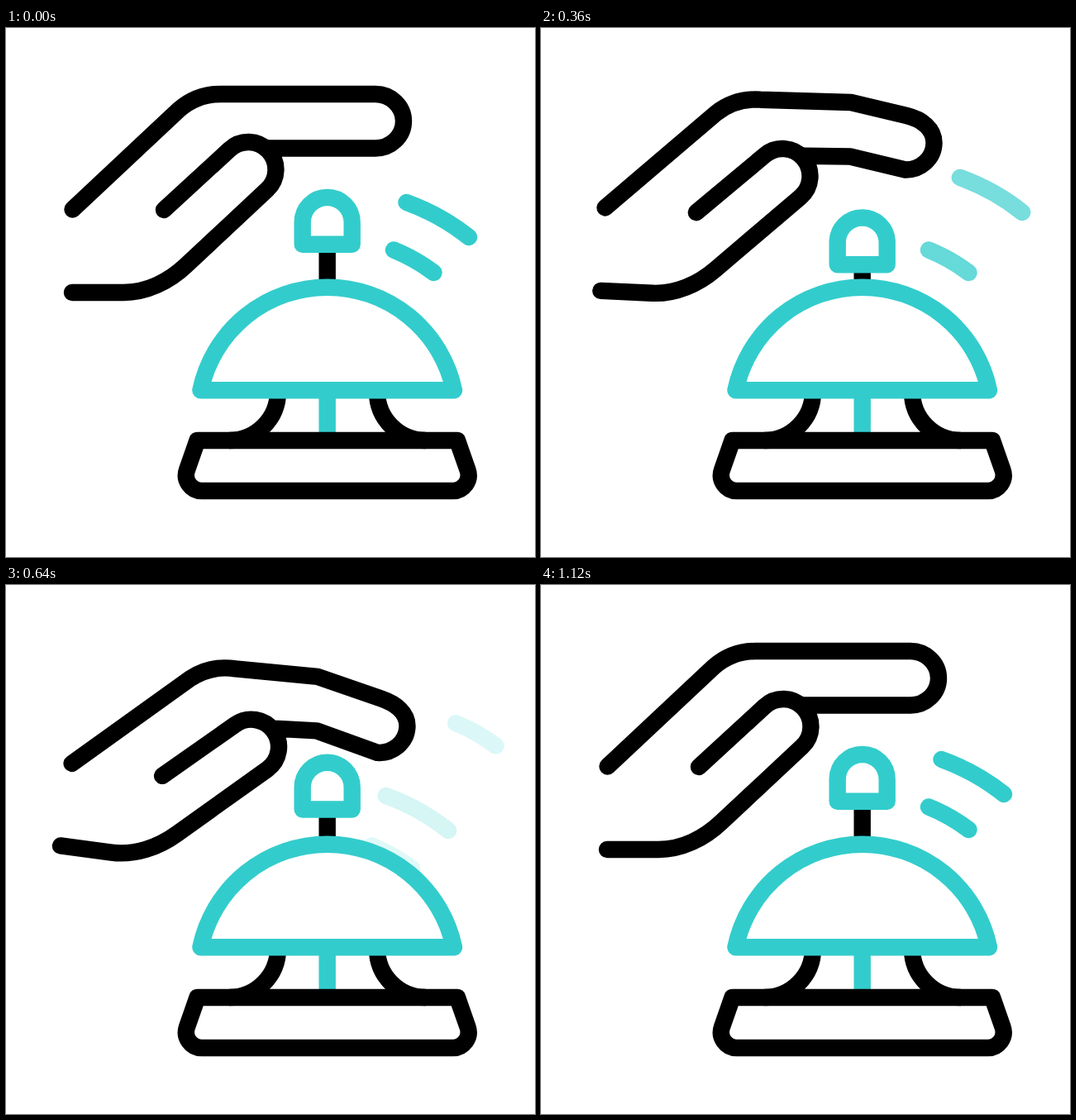
An HTML page for the animation above (1.48 s loop, 640x640 px).

```html
<!DOCTYPE html>
<html lang="en">
<head>
<meta charset="utf-8">
<title>Reception bell</title>
<style>
  html, body { margin: 0; width: 100%; height: 100%; overflow: hidden; background: #fff; }
  svg { display: block; width: 100vw; height: 100vh; }
  path { fill: none; stroke: #000; stroke-width: 20.4; stroke-linecap: round; stroke-linejoin: round; }
  .teal { stroke: #3cc; }
  .flat { stroke-linecap: butt; }
  .dome { fill: #fff; }
</style>
</head>
<body>
<svg viewBox="0 0 640 640">
  <defs>
    <path id="long" class="teal" d="M484.5 211Q526 226 560 253"/>
    <path id="short" class="teal" d="M469 268.5Q495 279 517.5 296"/>
  </defs>
  <use id="longOut" href="#long"/>
  <use id="shortOut" href="#short"/>
  <use id="longIn" href="#long"/>
  <use id="shortIn" href="#short"/>
  <g id="knob">
    <path class="flat" d="M388.7 262V318"/>
    <path class="teal" d="M358.7 261.7V235A30 30 0 0 1 418.7 235V261.7Z"/>
  </g>
  <path class="flat" d="M329 440A59 59 0 0 1 270 499M449 440A59 59 0 0 0 508 499"/>
  <path class="teal flat" d="M388.7 438V499"/>
  <path class="teal dome" d="M235.4 438.3A156.6 156.6 0 0 1 542 438.3Z"/>
  <path d="M231.5 499L219 534.6A19 19 0 0 0 237 560H540.5A19 19 0 0 0 558.5 534.6L546 499Z"/>
  <path id="hand"/>
</svg>
<script>
const LOOP = 1480, STEP = 40;
const $ = id => document.getElementById(id);

const linear = u => u;
const smooth = u => u * u * (3 - 2 * u);

// Interpolates rows of [time, ...values].
function track(rows, t, ease) {
  let i = 0;
  while (i < rows.length - 2 && t >= rows[i + 1][0]) i++;
  const [a, b] = [rows[i], rows[i + 1]];
  const u = Math.min(1, Math.max(0, (t - a[0]) / (b[0] - a[0])));
  return a.slice(1).map((v, k) => v + (b[k + 1] - v) * ease(u));
}

// time, wrist x y, palm angle, knuckle x y, fingertip x y
const HAND = [
  [120, 0, 0, 0, 0, 0, 0, 0],
  [280, -1, -3.5, 8.1, 0, 34.5, -3, 71],
  [440, -5, -0.5, -2.7, -2, -14.5, -8, -19],
  [600, -1, -4, 8.4, 1, 34.5, 5, 64],
  [800, 0, 0, 0, 0, 0, 0, 0]
];
const KNOB = [[240, 0], [360, 24.5], [480, 0], [560, 0], [760, 24.5], [840, 0]];

function turn([x, y], [cx, cy], deg) {
  const a = deg * Math.PI / 180, c = Math.cos(a), s = Math.sin(a);
  return [cx + (x - cx) * c - (y - cy) * s, cy + (x - cx) * s + (y - cy) * c];
}
const str = ([x, y]) => x.toFixed(2) + ' ' + y.toFixed(2);

function handPath([wx, wy, angle, kx, ky, tx, ty]) {
  const wrist = [80.5, 219.5];
  const palm = (x, y) => {
    const p = turn([x, y], wrist, angle);
    return str([p[0] + wx, p[1] + wy]);
  };
  const tip = (x, y) => {
    const p = turn([x, y], [446, 112.8], angle / 2);
    return [p[0] + tx, p[1] + ty];
  };
  const knuckle = [376 + kx, 80 + ky];
  const top = tip(447, 80);
  const slope = Math.atan2(top[1] - knuckle[1], top[0] - knuckle[0]);
  const lead = [top[0] + 18.5 * Math.cos(slope), top[1] + 18.5 * Math.sin(slope)];
  const at = (x, y) => str(tip(x, y));
  return `M${palm(80.5, 219.5)}L${palm(209, 99)}A77.7 77.7 0 0 1 ${palm(262, 80)}` +
    `L${str(knuckle)}L${str(top)}C${str(lead)} ${at(481, 94.7)} ${at(481, 112.8)}` +
    `C${at(481, 130.9)} ${at(465.5, 145.5)} ${at(447, 145.5)}` +
    `L${str([375 + kx, 145.5 + ky])}L${palm(318, 145.5)}` +
    `M${palm(191, 220)}L${palm(270.4, 147)}A33.2 33.2 0 0 1 ${palm(316, 195.4)}` +
    `L${palm(218, 287)}C${palm(197, 307)} ${palm(170, 320)} ${palm(142, 320)}L${palm(80, 320)}`;
}

function place(id, [x, y], [alpha]) {
  $(id).setAttribute('transform', `translate(${x.toFixed(2)} ${y.toFixed(2)})`);
  $(id).setAttribute('opacity', alpha.toFixed(3));
}

// A wave drifts off while fading, then a new one rises into place.
function wave(name, t, leave, gone, back) {
  place(name + 'Out', track([[leave, 0, 0], [gone, 86, -116]], t, smooth),
    track([[240, 1], [gone, 0]], t, linear));
  const shown = t < 560 ? [0] : track([[560, 0], [back, 1]], t, linear);
  place(name + 'In', track([[560, -31, 55], [back, 0, 0]], t, linear), shown);
}

function draw(t) {
  $('hand').setAttribute('d', handPath(track(HAND, t, smooth)));
  $('knob').setAttribute('transform', `translate(0 ${track(KNOB, t, linear)[0].toFixed(2)})`);
  wave('long', t, 240, 600, 960);
  wave('short', t, 360, 720, 1100);
}

const start = performance.now();
function tick() {
  const t = (performance.now() - start) % LOOP;
  draw(Math.floor(t / STEP) * STEP);
  requestAnimationFrame(tick);
}
tick();
</script>
</body>
</html>
```
